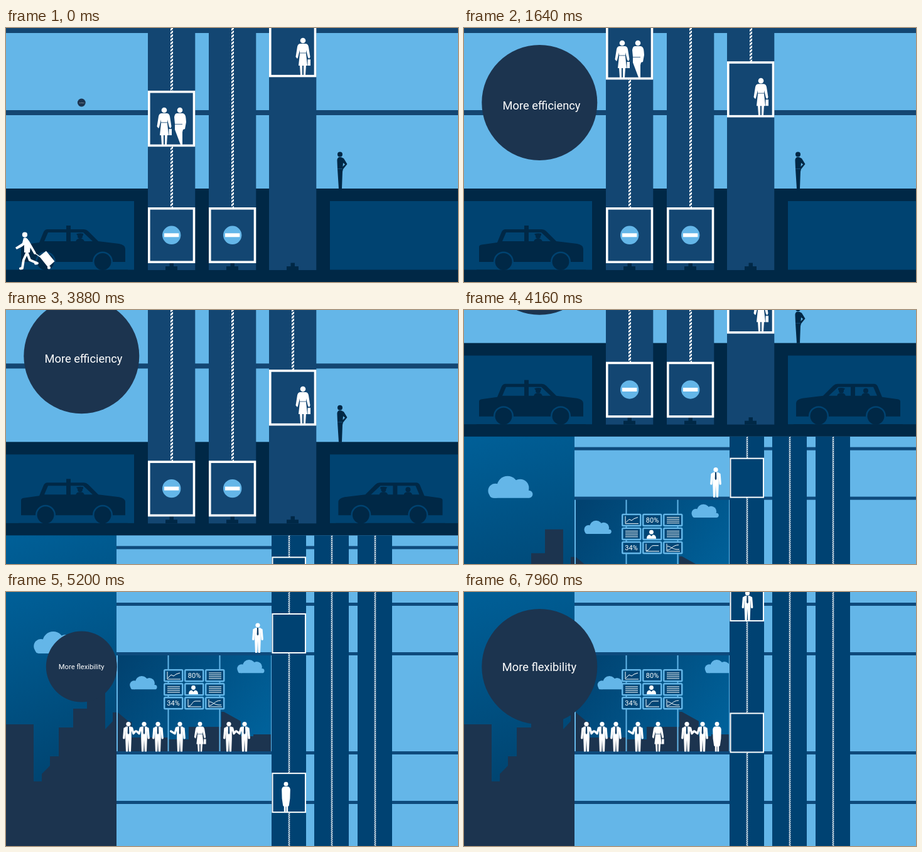
Animation, 720 px wide and 405 px high, one loop 8000 ms. Source, as an HTML page with a canvas:

```html
<!DOCTYPE html>
<html lang="en">
<head>
<meta charset="utf-8">
<title>Elevators</title>
<style>
  html, body { margin: 0; width: 100%; height: 100%; overflow: hidden; background: #002846; }
  canvas { display: block; width: 720px; height: 405px; }
</style>
</head>
<body>
<canvas id="stage" width="720" height="405"></canvas>
<script>
const ctx = document.getElementById('stage').getContext('2d');
const LOOP = 8000;
const SKY = '#64b6e8', SHAFT = '#134672', DARK = '#002846', ROOM = '#004371',
      TOWER_SHAFT = '#004272', BAND = '#0e4a7c', NIGHT = '#1c344f', WHITE = '#fff';

const clamp01 = v => Math.min(1, Math.max(0, v));
const progress = (t, start, length) => clamp01((t - start) / length);
const smooth = p => p * p * (3 - 2 * p);
const cubicInOut = p => p < .5 ? 4 * p ** 3 : 1 - 4 * (1 - p) ** 3;
const backOut = p => p <= 0 ? 0 : 1 + 1.95 * (p - 1) ** 3 + .95 * (p - 1) ** 2;

// Distance left to travel: constant speed, then an even slow-down.
function brake(t, brakeAt, speed, length) {
  const rest = speed * length / 2;
  return t < brakeAt ? rest + speed * (brakeAt - t) : rest * (1 - progress(t, brakeAt, length)) ** 2;
}

function rect(x, y, w, h, color) {
  ctx.fillStyle = color;
  ctx.fillRect(x, y, w, h);
}
function disc(x, y, r, color) {
  ctx.fillStyle = color;
  ctx.beginPath();
  ctx.arc(x, y, r, 0, 7);
  ctx.fill();
}
function shape(d, color) {
  ctx.fillStyle = color;
  ctx.fill(new Path2D(d));
}
function line(d, color, width) {
  ctx.strokeStyle = color;
  ctx.lineWidth = width;
  ctx.stroke(new Path2D(d));
}
function at(x, y, scale, draw) {
  ctx.save();
  ctx.translate(x, y);
  ctx.scale(scale, scale);
  draw();
  ctx.restore();
}
function clipped(x, y, w, h, draw) {
  ctx.save();
  ctx.beginPath();
  ctx.rect(x, y, w, h);
  ctx.clip();
  draw();
  ctx.restore();
}
function text(str, x, y, size) {
  ctx.font = `${size}px Roboto, sans-serif`;
  ctx.textAlign = 'center';
  ctx.fillStyle = WHITE;
  ctx.fillText(str, x, y);
}
function gradient(x0, y0, x1, y1, from, to) {
  const g = ctx.createLinearGradient(x0, y0, x1, y1);
  g.addColorStop(0, from);
  g.addColorStop(1, to);
  return g;
}

function rope(x, top, bottom, width, period) {
  if (bottom <= top) return;
  clipped(x - width / 2, top, width, bottom - top, () => {
    ctx.beginPath();
    for (let y = bottom; y > top - period; y -= period) {
      ctx.moveTo(x - width, y + width * .8);
      ctx.lineTo(x + width, y - width * .8);
    }
    ctx.strokeStyle = WHITE;
    ctx.lineWidth = period * .48;
    ctx.stroke();
  });
}
function cabin(x, y, w, h, border, fill) {
  rect(x, y, w, h, WHITE);
  rect(x + border, y + border, w - 2 * border, h - 2 * border, fill);
}
function noEntry(x, y) {
  disc(x, y, 14.7, SKY);
  rect(x - 11.7, y - 3, 23.4, 6, WHITE);
}

// Figures stand on the origin and are 59 units tall.
function woman() {
  disc(0, -55, 4.3, WHITE);
  shape('M-4-50H4Q8-50 9-45L11.5-29 10-26 8-28 5-40V-34L7-15H5L4 0H1V-15H-1V0H-4L-5-15H-7L-5-34V-40L-8-28-9-26-11.5-29-9-45Q-8-50-4-50Z', WHITE);
  rect(-5, -35.5, 10, .8, SHAFT);
  rect(7.5, -25, 4.5, 10, WHITE);
}
function casualMan() {
  disc(0, -55, 4.3, WHITE);
  shape('M-5-50H5Q9-49 9.5-42L10-36 8-25 5-24 4-20V0H1L-8-24V-33L-9-44Q-8-50-5-50Z', WHITE);
  rect(-8, -33, 12, .8, SHAFT);
}
function waitingMan() {
  disc(0, -54.5, 4, DARK);
  shape('M-2-50Q-5-48-4.5-44L-4-32-2 0H3L4-27 5-31 11.5-39 6-48 2-50Z', DARK);
  shape('M5-41 8-38.5 4.5-35Z', SKY);
  line('M-4-31.5H4', '#1d5480', .8);
}
function coatWoman() {
  disc(0, -55, 4.3, WHITE);
  shape('M-4-50H4Q8-49 8.5-44L8-26 6-12 4-10V0H.5V-10H-.5V0H-4V-10L-6-12-8-26-8.5-44Q-8-49-4-50Z', WHITE);
}
function arm(side, reach, lift) {
  ctx.lineCap = ctx.lineJoin = 'round';
  line(reach
    ? `M${side * 7}-47L${side * 10}-36 ${side * reach} ${-40 - lift}`
    : `M${side * 7.5}-46L${side * 9}-27`, WHITE, 4.2);
}
function suitMan(leftReach = 0, rightReach = 0, lift = 0) {
  disc(0, -55, 4.5, WHITE);
  shape('M-5-50H5L9-46 6-40V-26L5 0H1L0-24-1 0H-5L-6-26V-40L-9-46Z', WHITE);
  shape('M-1.2-50H1.2L1.7-37 0-34-1.7-37Z', '#0d3a63');
  arm(-1, leftReach, lift);
  arm(1, rightReach, lift);
}

function traveller(t) {
  const swing = Math.cos(t / 150);
  ctx.lineCap = ctx.lineJoin = 'round';
  disc(30, 329.7, 4.1, WHITE);
  shape('M28 335Q32 333 35 337L39 349 38 358H29V346L25 349 17 353 15 350 26 343Z', WHITE);
  for (const s of [swing, -swing]) {
    const foot = 38 - 12 * s;
    line(`M33.5 358L${33 - 5 * s} 370 ${foot} ${379 + 4 * s}l-3 .5`, WHITE, 4);
  }
  line('M35 340L46 359', WHITE, 3.5);
  line('M46 359L56 366', WHITE, 1.5);
  shape('M53 364 64 355.5 77.5 372 67 381.5Z', WHITE);
  disc(68.5, 382, 2.5, WHITE);
}

function rider(x, cap) {
  disc(x, 332, 4, DARK);
  shape(`M${x - 7} 341Q${x - 6} 335.5 ${x} 336Q${x + 6} 335.5 ${x + 7} 341Z`, DARK);
  if (cap) shape(`M${x - 6} 328.5Q${x} 326.5 ${x + 5} 328L${x + 5} 331H${x - 4}Z`, DARK);
}
function automobile(taxi) {
  shape('M24 349Q24 346 28 345.5L53 342 60 325Q62 321 66 321H124Q128 321 131 324L147 340 180 344Q190 346 190 352V373H24Z', DARK);
  shape('M61 340 67 326H96V340Z M103 340V326H123L138 340Z', ROOM);
  rider(118, true);
  if (taxi) rect(96, 315, 7, 8, DARK);
  else rider(79, false);
  for (const x of [63, 154]) {
    disc(x, 372.5, 16, ROOM);
    disc(x, 372.5, 13.5, DARK);
  }
  rect(20, 385.5, 174, 4, DARK);
}

function bubble(str, scale, textX, textY) {
  if (scale <= 0) return;
  at(120.3, 119, scale, () => {
    disc(0, 0, 92, NIGHT);
    text(str, textX - 120.3, textY - 119, 18.3);
  });
}

function lobby(t) {
  rect(0, 0, 720, 256, SKY);
  rect(0, 0, 720, 8, SHAFT);
  rect(0, 131, 720, 8, SHAFT);
  rect(0, 256, 720, 149, DARK);
  rect(0, 276, 204, 109.5, ROOM);
  rect(516, 276, 204, 109.5, ROOM);
  for (const x of [226, 323, 419]) {
    rect(x, 0, 75.3, 386, SHAFT);
    rect(x + 28, 380, 19, 6, DARK);
    rect(x + 34.5, 374.5, 6.5, 6, DARK);
  }
  for (const x of [226, 323]) {
    rope(x + 38, 0, 287, 4, 5.6);
    cabin(x, 286, 75.3, 89, 3.6, SHAFT);
    noEntry(x + 37.7, 330.3);
  }
  const risingTop = 100 - .0652 * t;
  cabin(226, risingTop, 75.3, 89.3, 3.6, SHAFT);
  at(252, risingTop + 86, 1, woman);
  at(277, risingTop + 86, 1, casualMan);

  const sinkingTop = -11 + .0391 * t;
  rope(457, 0, sinkingTop, 4, 5.6);
  cabin(419, sinkingTop, 75.3, 89.3, 3.6, SHAFT);
  at(473, sinkingTop + 86, 1, woman);

  at(532, 256, 1, waitingMan);
  automobile(true);
  ctx.save();
  ctx.translate(719 + brake(t, 3500, .1, 440), 0);
  ctx.scale(-1, 1);
  automobile(false);
  ctx.restore();
  at(-.064 * t, 0, 1, () => traveller(t));
  bubble('More efficiency', backOut(progress(t, -8, 500)), 123.5, 129.7);
}

function cloud(x, y, scale) {
  at(x, y, scale, () => {
    ctx.fillStyle = SKY;
    ctx.beginPath();
    ctx.roundRect(2, 23, 69, 12, 6);
    ctx.fill();
    disc(11.5, 23.5, 11.5, SKY);
    disc(31, 17, 17, SKY);
    disc(51, 19, 14, SKY);
    rect(11, 20, 48, 14, SKY);
  });
}

const textLines = () => line('M6 6H26M6 9H26M6 12H26M6 15H26', WHITE, 1);
const chart = curve => () => line('M6 4V16H27' + curve, WHITE, 1);
const SCREENS = [
  chart('M7 14L12 9 16 11 20 8 26 6'),
  () => text('80%', 16, 14, 11),
  textLines,
  textLines,
  () => {
    disc(14.5, 7.5, 3.4, WHITE);
    shape('M7 18Q7 11.5 12 11.5L14.5 14 17 11.5Q22 11.5 22 18Z', WHITE);
  },
  textLines,
  () => text('34%', 15.5, 14, 11),
  chart('M7 15C13 14 12 7 18 7H26'),
  chart('M7 8C13 8 14 14 26 13M7 14C13 14 15 6 25 6')
];
function screens() {
  ctx.lineCap = 'butt';
  SCREENS.forEach((content, i) => at(251 + 33 * (i % 3), 123 + 22 * Math.floor(i / 3), 1, () => {
    ctx.fillStyle = SKY;
    ctx.beginPath();
    ctx.roundRect(0, 0, 31.5, 20.5, 2.5);
    ctx.fill();
    rect(2.5, 2.5, 26.5, 15.5, '#014676');
    content();
  }));
}

const SKYLINE = 'M0 405V211H44V302H57V290L70 277V262H84V216H107V186H129V148H158V219L170 206V192H178L196 207H200V232H258V235H291V215H343V191H347L374 206V230H394V227H423V405Z';

function meeting(t) {
  const drift = .0056 * (t - 4440);
  rect(0, 0, 176, 405, gradient(20, 0, 120, 300, '#005f97', '#00436f'));
  cloud(40 + drift, 63, 1);
  clipped(0, 0, 177, 405, () => shape(SKYLINE, NIGHT));

  rect(176, 0, 544, 405, SKY);
  clipped(178, 98, 244, 158, () => {
    rect(176, 98, 250, 160, gradient(190, 100, 390, 250, '#014270', '#00619a'));
    cloud(193 + drift, 134, .61);
    cloud(364 + drift, 108, .61);
    shape(SKYLINE, NIGHT);
  });
  for (const x of [257.5, 339.5]) rect(x, 100, 2, 155, SKY);
  for (const y of [17, 96, 254, 333]) rect(176, y, 544, 5, BAND);
  screens();

  const lift = 3.5 + 3 * Math.cos((t - 4440) / 1400 * 2 * Math.PI);
  const person = (x, draw, y = 254.5) => at(x, y, .8, draw);
  person(195, () => suitMan(0, 14, lift));
  person(220, () => suitMan(15, 0, lift));
  person(242, () => suitMan());
  person(277, () => suitMan(18, 0, lift));
  person(309, woman);
  person(355, () => suitMan(0, 14, lift));
  person(380, () => suitMan(16, 0, lift));

  for (const x of [423, 491, 560]) {
    rect(x, 0, 55, 405, TOWER_SHAFT);
    rope(x + 28, 0, 405, 2.6, 3.2);
  }
  // Starting up is braking played backwards.
  const upperRise = brake(-t, -7480, .075, 400);
  const lowerDrop = brake(t, 5900, .107, 390);
  cabin(423.5, 34 - upperRise, 54.5, 64, 2, TOWER_SHAFT);
  cabin(423.5, 192.5 + lowerDrop, 54.5, 64, 2, TOWER_SHAFT);

  const walk = smooth(progress(t, 6540, 560));
  person(401 + 50.5 * walk, () => suitMan(), 97 - upperRise);
  person(446 - 43 * walk, coatWoman, 254.5 + lowerDrop);
  bubble('More flexibility', backOut(progress(t, 5100, 500)), 120, 126.3);
}

function frame() {
  const t = performance.now() % LOOP;
  const scroll = 405 * cubicInOut(progress(t, 3447, 1426));
  if (scroll > 0) at(0, 405 - scroll, 1, () => meeting(t));
  if (scroll < 405) at(0, -scroll, 1, () => clipped(0, 0, 720, 405, () => lobby(t)));
  requestAnimationFrame(frame);
}
frame();
</script>
</body>
</html>
```
